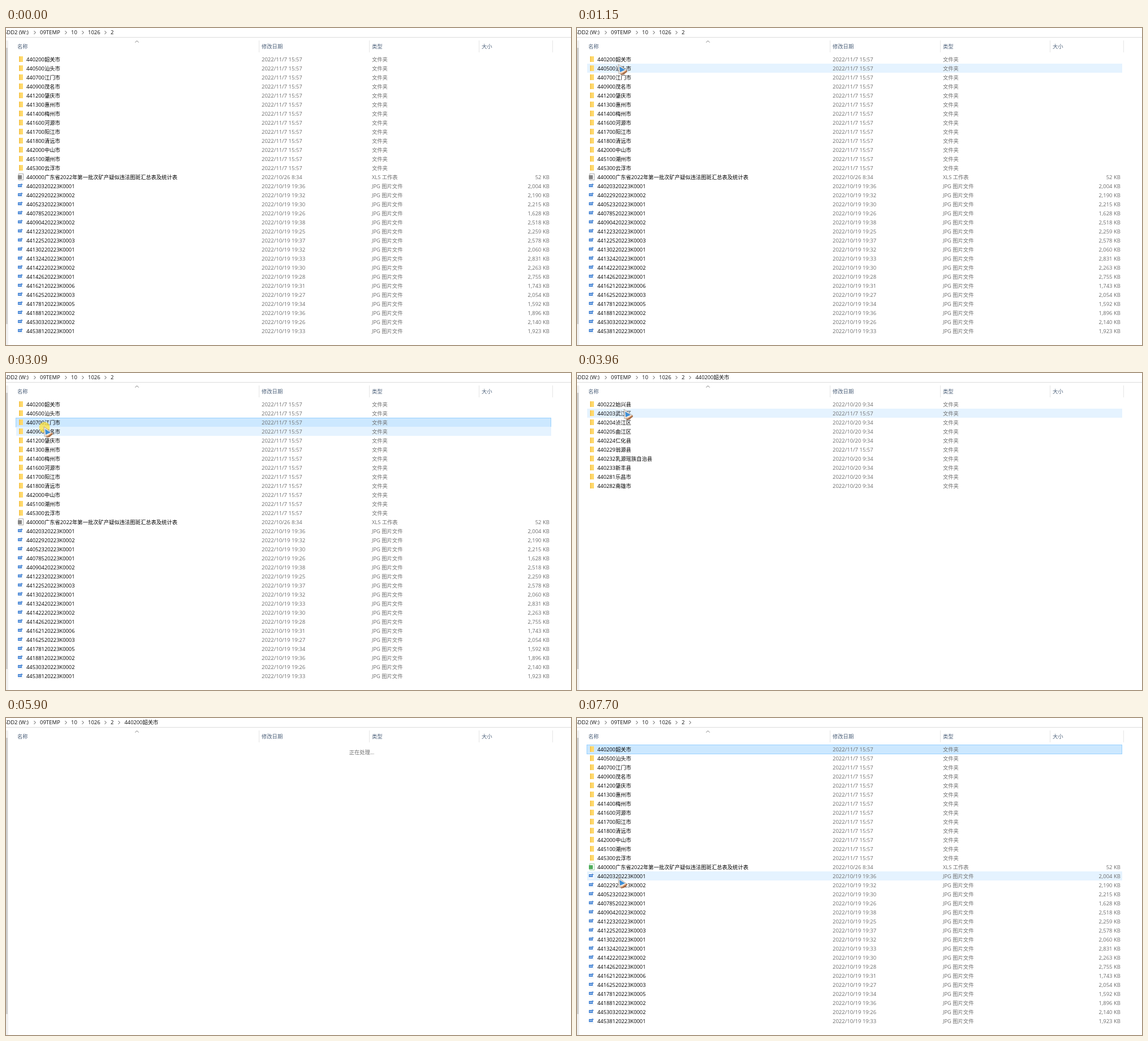
An HTML page with a canvas that plays this animation: 999x560 px, repeating every 8 s.

```html
<!DOCTYPE html>
<html lang="zh-CN">
<head>
<meta charset="utf-8">
<style>
html, body { margin: 0; width: 100%; height: 100%; overflow: hidden; background: #fff; }
canvas { display: block; }
</style>
</head>
<body>
<canvas id="stage" width="999" height="560"></canvas>
<script>
const ctx = document.getElementById('stage').getContext('2d');
const LOOP = 8000, TICK = 78, FIRST = 124, ROW_TOP = 47, ROW_H = 16;
const GRAY = '#6d6d6d';

const folder = (name, date) => ({ kind: 'folder', name, date, type: '文件夹', size: '' });
const image = (name, time, size) => ({ kind: 'image', name, date: '2022/10/19 ' + time, type: 'JPG 图片文件', size: size + ' KB' });

const ROOT = [
  ...`440200韶关市 440500汕头市 440700江门市 440900茂名市 441200肇庆市 441300惠州市 441400梅州市
  441600河源市 441700阳江市 441800清远市 442000中山市 445100潮州市 445300云浮市`
    .split(/\s+/).map(name => folder(name, '2022/11/7 15:57')),
  { kind: 'sheet', name: '440000广东省2022年第一批次矿产疑似违法图斑汇总表及统计表',
    date: '2022/10/26 8:34', type: 'XLS 工作表', size: '52 KB' },
  ...`44020320223K0001 19:36 2,004
    44022920223K0002 19:32 2,190
    44052320223K0001 19:30 2,215
    44078520223K0001 19:26 1,628
    44090420223K0002 19:38 2,518
    44122320223K0001 19:25 2,259
    44122520223K0003 19:37 2,578
    44130220223K0001 19:32 2,060
    44132420223K0001 19:33 2,831
    44142220223K0002 19:30 2,263
    44142620223K0001 19:28 2,755
    44162120223K0006 19:31 1,743
    44162520223K0003 19:27 2,054
    44178120223K0005 19:34 1,592
    44188120223K0002 19:36 1,896
    44530320223K0002 19:26 2,140
    44538120223K0001 19:33 1,923`.split('\n').map(line => image(...line.trim().split(' ')))
];

const CITY = `400222始兴县 440203武江区 440204浈江区 440205曲江区 440224仁化县 440229翁源县
  440232乳源瑶族自治县 440233新丰县 440281乐昌市 440282南雄市`.split(/\s+/)
  .map(name => folder(name, /武江|翁源/.test(name) ? '2022/11/7 15:57' : '2022/10/20 9:34'));

// Window changes; each one updates the state from its tick on.
const EVENTS = [
  [22, { selected: 14 }],
  [38, { selected: 2 }],
  [44, { selected: 0 }],
  [47, { items: [], level: 1, selected: -1 }],
  [48, { items: CITY }],
  [51, { selected: 1 }],
  [55, { items: [], level: 2 }],
  [57, { note: '此文件夹为空。' }],
  [74, { level: 1, note: '正在处理...' }],
  [76, { items: CITY, note: '' }],
  [78, { more: true }],
  [83, { items: [] }],
  [85, { level: 0, more: false, selected: 0 }],
  [86, { items: ROOT }],
  [88, { more: true }]
];
const CLICKS = [22, 38, 44, 51];

// Pointer moves: start tick, end tick, destination
const MOVES = [
  [-1, 0, 450, 446], [0, 2, 495, 350], [2, 5, 260, 166], [5, 9, 73, 66], [11, 12, 73, 60], [12, 13, 73, 64],
  [16, 20, 80, 276], [23, 28, 89, 327], [29, 34, 67, 95], [40, 42, 76, 54], [47, 49, 83, 64],
  [60, 62, 86, 208], [62, 64, 258, 135], [64, 66, 39, -4],
  [92, 93, 82, 298], [93, 94, 80, 321], [95, 97, 73, 282]
];

function stateAt(tick) {
  const state = { items: ROOT, level: 0, selected: -1, note: '', more: false };
  for (const [from, change] of EVENTS) if (tick >= from) Object.assign(state, change);
  return state;
}

function pointerAt(tick) {
  if (tick < 0 || (tick >= 70 && tick < 93)) return null;
  let x = 0, y = 0;
  for (const [from, to, toX, toY] of MOVES) {
    const k = Math.min(1, Math.max(0, (tick - from) / (to - from)));
    x += (toX - x) * k;
    y += (toY - y) * k;
  }
  return { x, y };
}

function rect(x, y, w, h, color) {
  ctx.fillStyle = color;
  ctx.fillRect(x, y, w, h);
}

function text(str, x, y, color = '#000', size = 9.3, align = 'left') {
  ctx.font = `${size}px "Open Sans", "Noto Sans", "Noto Sans CJK SC", "Noto Sans CJK", sans-serif`;
  ctx.textAlign = align;
  ctx.fillStyle = color;
  ctx.fillText(str, x, y + 3.7);
}

function trace(points) {
  ctx.beginPath();
  points.forEach(([x, y]) => ctx.lineTo(x, y));
}

function line(points, color, width = 1) {
  trace(points);
  ctx.strokeStyle = color;
  ctx.lineWidth = width;
  ctx.stroke();
}

function shape(points, color) {
  trace(points);
  ctx.fillStyle = color;
  ctx.fill();
}

const chevron = x => line([[x - 1.5, 5], [x + 1.3, 8], [x - 1.5, 11]], '#555');

function drawFrame({ level, more }) {
  [['SDD2 (W:)', -4], ['09TEMP', 60], ['10', 115], ['1026', 145], ['2', 185]]
    .forEach(([str, x]) => text(str, x, 7, '#111', 9.5));
  [51, 106, 136, 176].forEach(chevron);
  if (level > 0 || more) chevron(200);
  if (level > 0) text('440200韶关市', 209.5, 7, '#111');
  if (level > 1 || (level === 1 && more)) chevron(279);
  if (level > 1) text('440203武江区', 288, 7, '#111');
  rect(0, 16, 999, 1, '#dcdcdc');

  rect(0, 22, 4, 538, '#f0f0f0');
  rect(0, 35, 3, 488, '#cdcdcd');

  [['名称', 20], ['修改日期', 452], ['类型', 647], ['大小', 841]]
    .forEach(([str, x]) => text(str, x, 32, '#4c607a'));
  [447, 642, 836, 966].forEach(x => rect(x, 22, 1, 21, '#e5e5e5'));
  line([[228.5, 25.5], [231.5, 22.5], [234.5, 25.5]], '#777');
}

function drawIcon(kind, y, refreshed) {
  if (kind === 'folder') {
    rect(23, y - 5, 7, 10, '#ffd96c');
    rect(23, y - 5, 2, 10, '#f7c64f');
  } else if (kind === 'sheet') {
    ctx.strokeStyle = refreshed ? '#9fcca5' : '#aaa';
    ctx.lineWidth = 1;
    ctx.strokeRect(22.5, y - 5.5, 8, 11);
    rect(21, y - 3, 7, 7, refreshed ? '#4fae5b' : '#858585');
  } else {
    rect(21, y - 5, 9, 10, '#f4f7fa');
    rect(21, y - 3, 7, 5, '#4585d6');
    rect(22, y - 1, 5, 1, '#c6dcf5');
    shape([[26, y - 5], [30, y - 2], [28, y - 2]], '#3978c8');
  }
}

function drawRow(item, y, refreshed) {
  drawIcon(item.kind, y, refreshed);
  text(item.name, 36, y);
  text(item.date, 452, y, GRAY, 9.5);
  text(item.type, 647, y, GRAY);
  text(item.size, 961, y, GRAY, 9.5, 'right');
}

function drawPointer({ x, y }, clicked) {
  ctx.save();
  ctx.translate(x, y);
  if (clicked) {
    ctx.beginPath();
    ctx.arc(1, 1, 9.5, 0, 7);
    ctx.fillStyle = 'rgba(255, 226, 60, .75)';
    ctx.fill();
  }
  const body = [[0, 0], [1, 17], [6, 17], [15, 11], [0, 0]];
  shape([[1, 14], [5, 19], [10, 18], [16, 13], [15, 10]], '#a5673f');
  shape(body, '#f5ede4');
  line(body, '#a39a94', 0.8);
  shape([[2, 4], [3, 14], [12, 10]], '#3e8fd6');
  line([[3, 16], [8, 15], [14, 11]], '#e7a272', 1.2);
  ctx.restore();
}

function draw(time) {
  const tick = Math.floor((time % LOOP - FIRST) / TICK);
  const state = stateAt(tick);
  const pointer = pointerAt(tick);
  const hovered = pointer ? Math.floor((pointer.y - ROW_TOP) / ROW_H) : -1;

  rect(0, 0, 999, 560, '#fff');
  drawFrame(state);
  state.items.forEach((item, i) => {
    const top = ROW_TOP + i * ROW_H;
    if (i === state.selected) {
      rect(17, top, 947, 17, '#99d1ff');
      rect(18, top + 1, 945, 15, '#cce8ff');
    } else if (i === hovered) {
      rect(18, top, 946, 16, '#e5f3ff');
    }
    drawRow(item, top + ROW_H / 2, tick >= 86);
  });
  if (state.note) text(state.note, 629, 60, GRAY, 9.3, 'center');
  if (pointer) drawPointer(pointer, CLICKS.includes(tick));
}

const start = performance.now();
function loop() {
  draw(performance.now() - start);
  requestAnimationFrame(loop);
}
loop();
</script>
</body>
</html>
```
